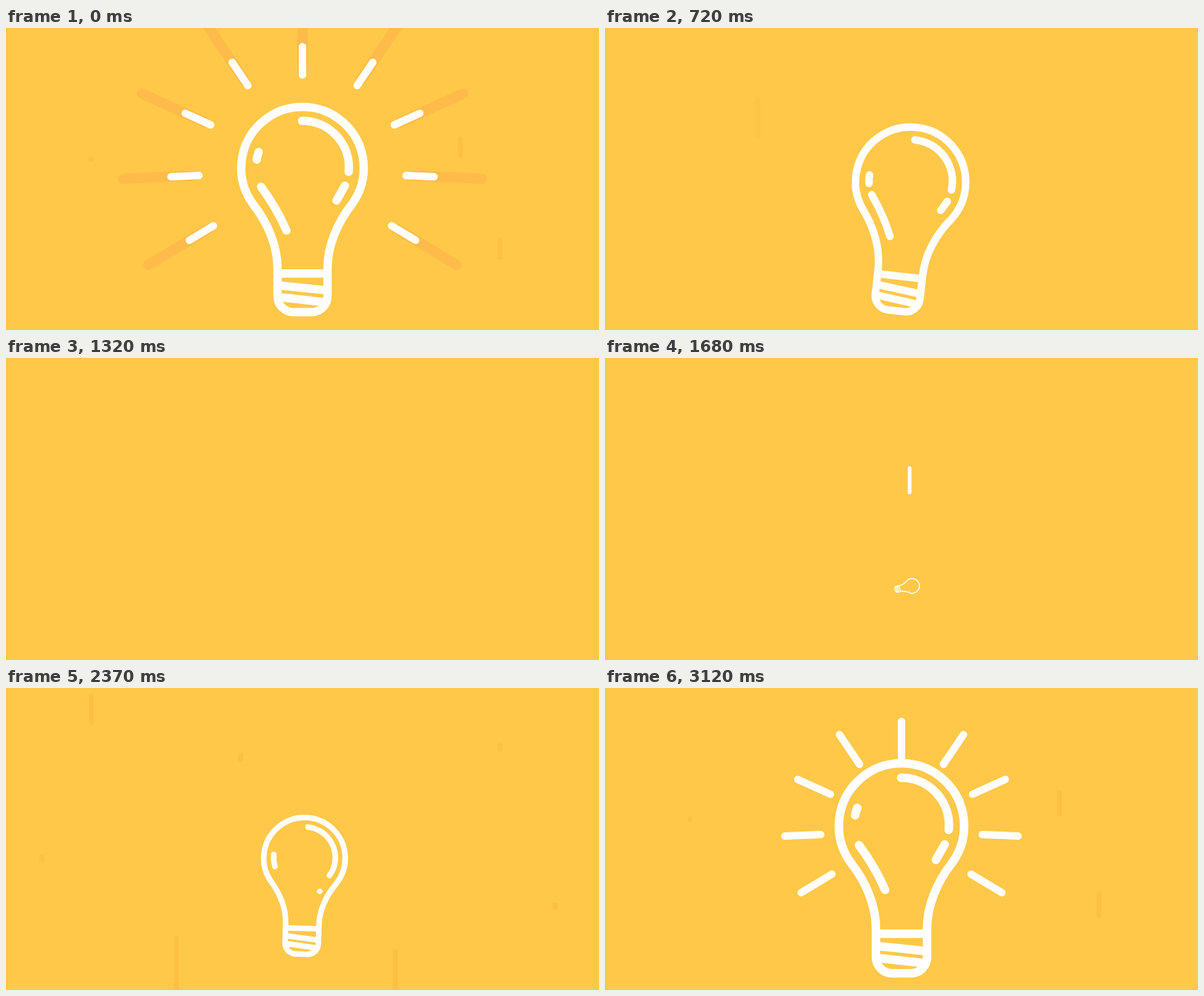
Write an HTML page with a canvas that moves like this. It is 800 px wide and 408 px high and loops after 3.15 s.

```html
<!DOCTYPE html>
<html lang="en">
<head>
<meta charset="utf-8">
<title>Light bulb</title>
<style>
  html, body { margin: 0; height: 100%; overflow: hidden; background: #ffc849; }
  canvas { display: block; }
</style>
</head>
<body>
<canvas id="stage" width="800" height="408"></canvas>
<script>
const ctx = document.getElementById('stage').getContext('2d');
const LOOP = 3150, START = 1320;   // the cycle starts on the empty stage
const RAD = Math.PI / 180;

const clamp = u => Math.min(1, Math.max(0, u));
const mix = (a, b, u) => a + (b - a) * u;
const easeOut = (t, start, span) => 1 - (1 - clamp((t - start) / span)) ** 3;

// Smooth monotone curve through [time, value] points.
function curve(...pts) {
  const last = pts.length - 1;
  const rate = i => (pts[i + 1][1] - pts[i][1]) / (pts[i + 1][0] - pts[i][0]);
  const slope = i => {
    if (i === 0) return rate(0);
    if (i === last) return rate(last - 1);
    const a = rate(i - 1), b = rate(i);
    return a * b > 0 ? 2 * a * b / (a + b) : 0;
  };
  return t => {
    if (t <= pts[0][0]) return pts[0][1];
    if (t >= pts[last][0]) return pts[last][1];
    let i = 0;
    while (t >= pts[i + 1][0]) i++;
    const d = pts[i + 1][0] - pts[i][0], u = (t - pts[i][0]) / d, v = 1 - u;
    return v * v * (1 + 2 * u) * pts[i][1] + u * u * (3 - 2 * u) * pts[i + 1][1]
      + d * u * v * (v * slope(i) - u * slope(i + 1));
  };
}

// Bulb: grow in steps while the spin dies out, crouch, hop, then fall.
const size = curve([1560, 0], [1980, .394], [2370, .65], [2790, .789],
  [3120, 1], [3150, .978], [3300, .92], [4470, .85]);
const tilt = curve([1560, 110], [1980, 14.5], [2790, -3.3], [3090, 0], [3690, 0], [3870, 6.4], [4470, 46]);
const hop = curve([3690, 311], [3870, 317], [3970, 252]);
const height = t => t < 3970 ? hop(t) : 252 + 310 * ((t - 3970) / 500) ** 2;

// Reflections slide along one inner path: origin, then end point and start time of head and tail.
const glints = [
  [32, 177, 1720, 70, 2310],
  [0, 51, 2450, 34, 2762],
  [221, 287, 2832, 274, 2855],
  [200, 375, 2135, 305, 2050]
];

// Falling streaks: x, start time, top of the path, delay of the upper end.
const streaks = [
  [317, 1491, -140, 350], [230, 1972, 297, 350], [525.5, 1921, 336, 430],
  [115, 2160, -62, 90], [666.5, 2362, 77, 430], [613, 2362, -60, 430],
  [741, 2365, 293, 390], [48.5, 2365, 228, 200], [206, 3180, -80, 430]
];
const FALL = 240, FALL_TIME = 1150;

// Inner point and angle of the rays on the right half.
const rays = [[400, 95, -90], [456, 104, -56], [495, 144, -24.5], [508, 198, 2.4], [493, 251, 31]];
const rayHead = curve([2970, 0], [3120, 49], [3150, 69], [3300, 130]);
const rayTail = curve([3120, 0], [3150, 31], [3340, 130]);

const outline = new Path2D(`M-34.5 139C-34.5 108-48 76-68 50.5A84.5 84.5 0 1 1 68 50.5
  C48 76 34.5 108 34.5 139V177A22 22 0 0 1 12.5 199.5H-12.5A22 22 0 0 1-34.5 177Z
  M-34.5 146H34.5M-34 162.5L34 169.5M-34 178.5L28 185.5`);
const inner = new Path2D('M34 68L59 24A64 64 0 1 0-59 24Q-34 57-20 92');

function line(x1, y1, x2, y2, color, width) {
  ctx.strokeStyle = color;
  ctx.lineWidth = width;
  ctx.beginPath();
  ctx.moveTo(x1, y1);
  ctx.lineTo(x2, y2 + .01);
  ctx.stroke();
}

function drawStreaks(t) {
  ctx.globalAlpha = clamp((4000 - t) / 260);
  for (const [x, start, y, lag] of streaks) {
    if (t < start || t > start + FALL_TIME) continue;
    const top = y + FALL * easeOut(t, start + lag, FALL_TIME - lag);
    line(x, top, x, y + FALL * easeOut(t, start, FALL_TIME), '#ffbe44', 6.5);
  }
  ctx.globalAlpha = 1;
}

function drawRays(from, to, color, width) {
  for (const [x, y, deg] of rays) {
    const c = Math.cos(deg * RAD), s = Math.sin(deg * RAD);
    for (const side of [1, -1]) {
      const px = d => 400 + side * (x - 400 + c * d);
      line(px(from), y + s * from, px(to), y + s * to, color, width);
    }
  }
}

function drawBulb(t) {
  const s = size(t);
  if (s <= 0) return;
  ctx.save();
  ctx.translate(400, height(t));
  ctx.rotate(tilt(t) * RAD);
  ctx.scale(s, s);
  ctx.translate(0, -125);
  ctx.strokeStyle = '#fff';
  ctx.lineWidth = 11.5;
  ctx.stroke(outline);
  for (const [origin, headEnd, headStart, tailEnd, tailStart] of glints) {
    if (t < headStart - 100) continue;
    const head = mix(origin, headEnd, easeOut(t, headStart, 1000));
    const tail = mix(origin, tailEnd, easeOut(t, tailStart, 1000));
    ctx.setLineDash([Math.max(.01, head - tail), 2000]);
    ctx.lineDashOffset = -tail;
    ctx.stroke(inner);
  }
  ctx.restore();
}

function draw(now) {
  let t = now % LOOP;
  if (t < START) t += LOOP;
  ctx.fillStyle = '#ffc849';
  ctx.fillRect(0, 0, 800, 408);
  ctx.lineCap = ctx.lineJoin = 'round';
  drawStreaks(t);
  if (t > 3140 && t < 3480) drawRays(mix(40, 134, clamp((t - 3150) / 330)), 134, '#ffbb49', 14);
  if (t > 2970 && t < 3340) drawRays(rayTail(t), rayHead(t), '#fff', 10);
  if (t > 1500 && t < 2000) {
    const y = start => mix(73, 203, easeOut(t, start, 400));
    line(411, y(1580), 411, y(1500), '#fff', 5);
  }
  drawBulb(t);
}

const begin = performance.now();
function tick() {
  draw(performance.now() - begin);
  requestAnimationFrame(tick);
}
tick();
</script>
</body>
</html>
```
